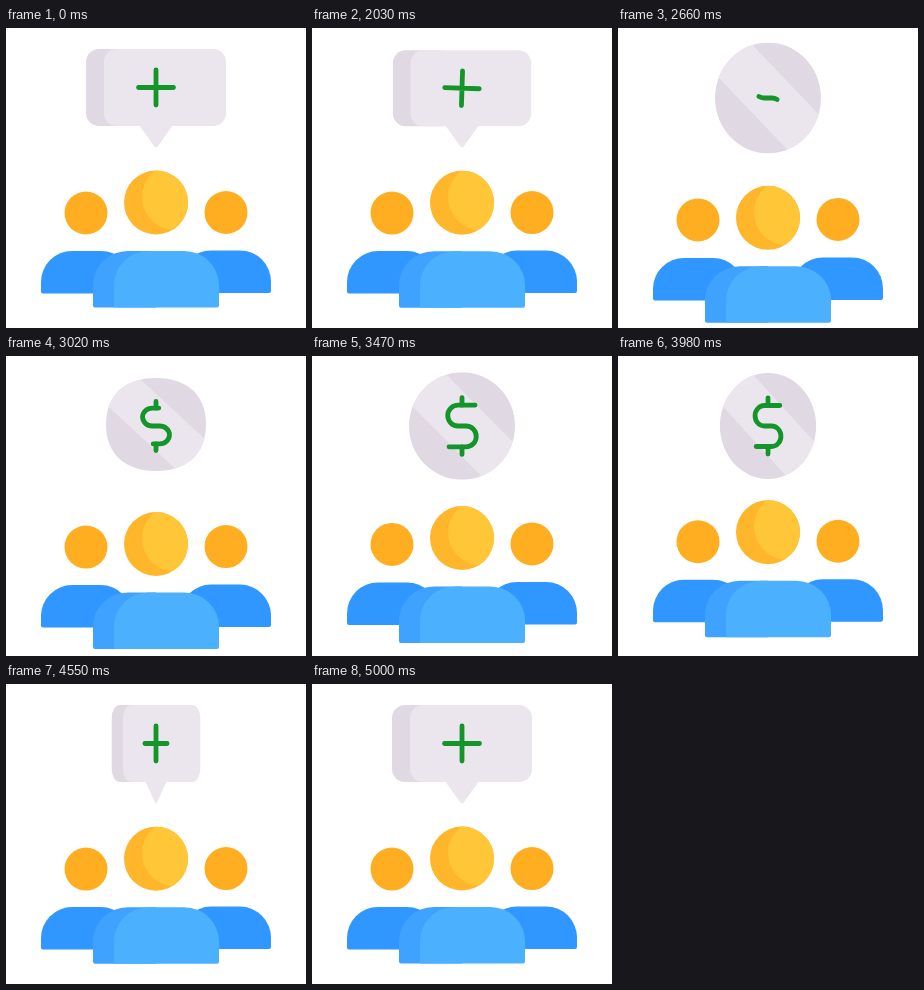
These frames come from a looping animation (300 by 300 pixels, 5030 ms). An HTML page:

```html
<!DOCTYPE html>
<html lang="en">
<head>
<meta charset="utf-8">
<title>Team and coin</title>
<style>
  html, body { margin: 0; width: 100%; height: 100%; overflow: hidden; background: #fff; }
  svg { display: block; width: 100vw; height: 100vh; }
  .ink { fill: none; stroke: #13952a; stroke-width: 4.8px; stroke-linecap: round; stroke-linejoin: round; }
  #plus { vector-effect: non-scaling-stroke; }
</style>
</head>
<body>
<svg viewBox="0 0 300 300">
  <defs>
    <clipPath id="headClip"><circle cx="150" cy="174.5" r="32"/></clipPath>
    <clipPath id="coinClip"><path id="coinEdge"/></clipPath>
    <g id="sidePerson">
      <circle cx="80" cy="185" r="21.5" fill="#ffae21"/>
      <path d="M37 265.5 Q35 265.5 35 263.5 V254 A31 31 0 0 1 66 223 H95 A31 31 0 0 1 126 254 V265.5 Z" fill="#2f97ff"/>
    </g>
  </defs>

  <g id="sides">
    <use href="#sidePerson"/>
    <use href="#sidePerson" transform="translate(300 -.5) scale(-1 1)"/>
  </g>

  <g id="leader">
    <circle cx="150" cy="174.5" r="32" fill="#ffb62b"/>
    <circle cx="169" cy="169" r="33" fill="#ffc738" clip-path="url(#headClip)"/>
    <path d="M89 279.5 Q87 279.5 87 277.5 V257 A35 34 0 0 1 122 223 H150 V279.5 Z" fill="#40a2ff"/>
    <path d="M108 279.5 V257 A35 34 0 0 1 143 223 H178 A35 34 0 0 1 213 257 V277.5 Q213 279.5 211 279.5 Z" fill="#4bb1ff"/>
  </g>

  <g id="bubble">
    <rect x="80" y="21" width="60" height="77" rx="13" fill="#e0d9e3"/>
    <rect x="98" y="21" width="122" height="77" rx="13" fill="#ebe6ed"/>
    <path d="M133 97 H167 L152 118 Q150 120.5 148 118 Z" fill="#ebe6ed"/>
    <path id="plus" class="ink" d="M150 42 V77 M132.5 59.5 H167.5"/>
  </g>

  <g id="coin">
    <g id="disc" clip-path="url(#coinClip)">
      <rect x="-70" y="-70" width="140" height="140" fill="#e0d9e3"/>
      <path d="M-80 -115 L80 45 V110 L-80 -50 Z" fill="#ebe6ed"/>
    </g>
    <g class="ink" transform="translate(150 70)">
      <path id="curve" pathLength="100"/>
      <path id="ticks"/>
    </g>
  </g>
</svg>
<script>
const LOOP = 5030, HOLD = 2030, STEP = 30, START = 2000;
const COIN_IN = 2380, SQUASH = 3020, FLIP_START = 3845, FLIP_MID = 4290, FLIP_END = 4950;
const RADIUS = 53;

const el = id => document.getElementById(id);
const set = (id, name, value) => el(id).setAttribute(name, value);
const show = (id, on) => set(id, 'display', on ? 'inline' : 'none');
const progress = (t, from, to) => Math.min(1, Math.max(0, (t - from) / (to - from)));
const smooth = u => u * u * (3 - 2 * u);

function discPath(roundness) {
  const r = RADIUS, c = r * roundness;
  return `M0 ${-r} C${c} ${-r} ${r} ${-c} ${r} 0 S${c} ${r} 0 ${r} S${-r} ${c} ${-r} 0 S${-c} ${-r} 0 ${-r} Z`;
}

// The sign is scaled by its geometry so that its line weight stays constant.
function dollarPath(sx, sy) {
  const end = 13 * sx, flat = 4 * sx, rx = 10.25 * sx, ry = 10.25 * sy;
  return `M${end} ${-2 * ry} H${-flat} A${rx} ${ry} 0 0 0 ${-flat} 0 H${flat} A${rx} ${ry} 0 0 1 ${flat} ${2 * ry} H${-end}`;
}

function drawPeople(t) {
  const settle = 1 / (1 + Math.exp((t - 3440) / 250));
  const drop = 16 * smooth(progress(t, START, START + 520)) * settle;
  set('leader', 'transform', `translate(0 ${drop})`);
  set('sides', 'transform', `translate(0 ${drop * .45})`);
}

function drawBubble(t) {
  const returning = t >= FLIP_MID;
  const out = progress(t, START, START + 490);
  const shrink = 1 - .2 * out - .8 * out ** 8;
  const open = 1 - (1 - progress(t, FLIP_MID, FLIP_END)) ** 2;
  const sx = returning ? open : shrink, sy = returning ? 1 : shrink;
  const spin = returning ? 0 : 210 * out ** 1.7;
  show('bubble', sx > .001);
  set('bubble', 'transform', `translate(150 118) scale(${sx} ${sy}) translate(-150 -118)`);
  set('plus', 'transform', `rotate(${spin} 150 59.5)`);
}

function drawCoin(t) {
  const grow = smooth(progress(t, COIN_IN, COIN_IN + 140));
  const squash = Math.exp(-(((t - SQUASH) / 170) ** 2));
  const stretch = 1 - progress(t, COIN_IN, FLIP_START);
  const flip = 1 - progress(t, FLIP_START, FLIP_MID) ** 2;
  const sx = grow * flip * (1 - .057 * squash);
  const sy = grow * (1 + .06 * stretch - .157 * squash);
  show('coin', sx > .001);
  set('disc', 'transform', `translate(150 ${70 - 1.5 * squash}) scale(${sx} ${sy})`);
  set('coinEdge', 'd', discPath(.552 + .078 * squash));

  const drawn = 100 * progress(t, 2560, 3130);
  show('curve', drawn > 0);
  show('ticks', drawn > 50);
  set('curve', 'd', dollarPath(sx, sy));
  set('curve', 'stroke-dasharray', drawn < 100 ? `${drawn} 200` : 'none');
  set('curve', 'stroke-dashoffset', (drawn - 100) / 2);
  set('ticks', 'd', `M0 ${-28 * sy} V${-20.5 * sy} M0 ${20.5 * sy} V${28 * sy}`);
}

function draw(time) {
  const t = time < HOLD ? 0 : HOLD + STEP * Math.floor((time - HOLD) / STEP);
  drawPeople(t);
  drawBubble(t);
  drawCoin(t);
}

const began = performance.now();
function tick() {
  draw((performance.now() - began) % LOOP);
  requestAnimationFrame(tick);
}
tick();
</script>
</body>
</html>
```
